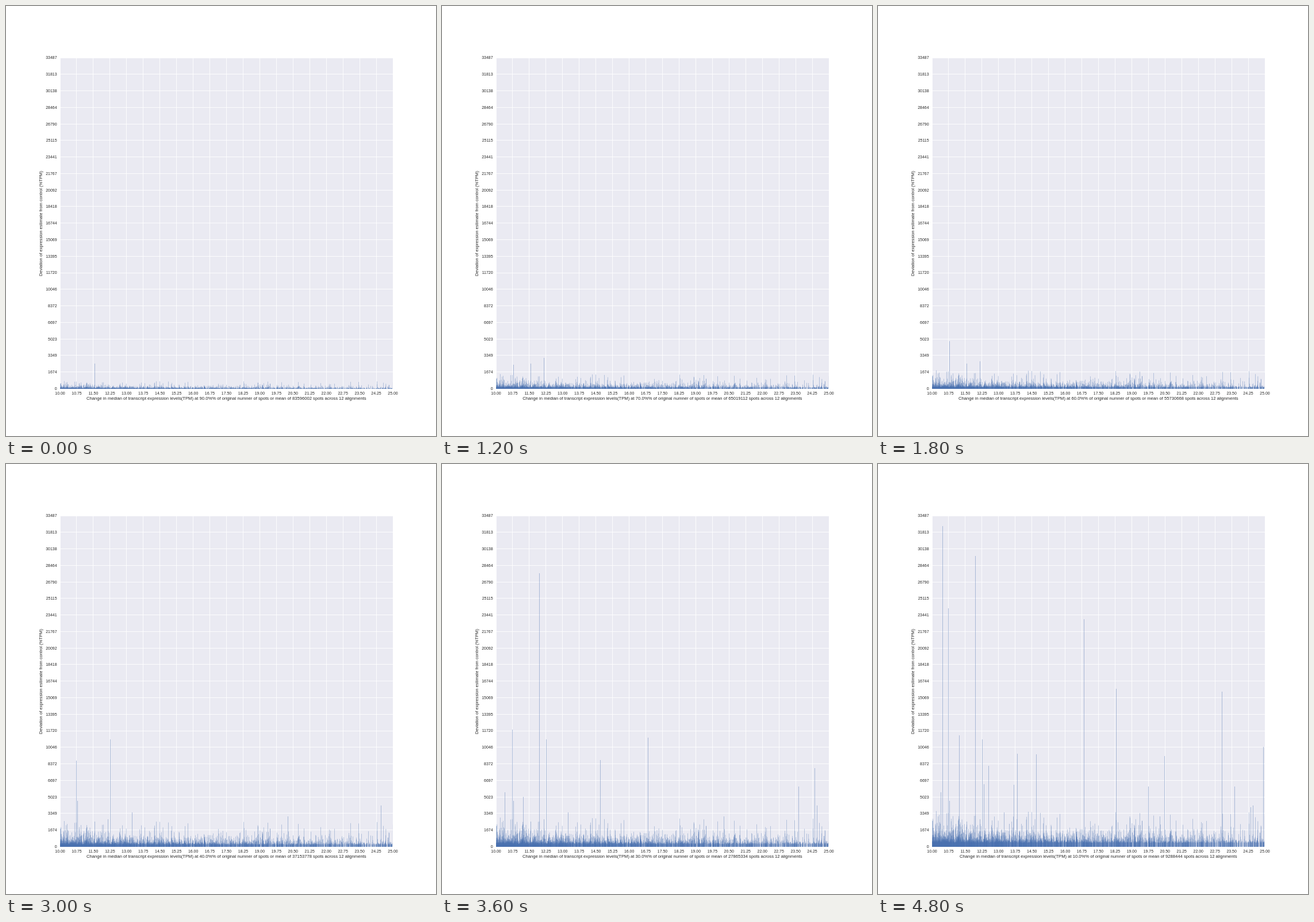
These frames come from a looping animation (748 by 748 pixels, 5.4 s). An HTML page with a canvas:

```html
<!DOCTYPE html>
<html lang="en">
<head>
<meta charset="utf-8">
<title>Expression deviation</title>
<style>
  html, body { margin: 0; width: 100%; height: 100%; overflow: hidden; background: #fff; }
  canvas { display: block; }
</style>
</head>
<body>
<canvas id="chart" width="748" height="748"></canvas>
<script>
const ctx = document.getElementById('chart').getContext('2d');
const STEP_MS = 600, STEPS = 9, TICKS = 20;
const LEFT = 94, RIGHT = 673, TOP = 90, BOTTOM = 666;
const WIDTH = RIGHT - LEFT, HEIGHT = BOTTOM - TOP;
const TOTAL_SPOTS = 92884447, MAX_DEVIATION = 33487;

// Outliers: x, first step, then bar heights; the last height stays.
const spikes = [
  [154, 0, 44],
  [177, 1, 72, 54, 48],
  [124, 2, 42, 83, 80],
  [219, 4, 60],
  [490, 4, 53],
  [652, 4, 72],
  [181, 4, 95, 187],
  [122, 5, 150, 204, 195, 415],
  [109, 6, 95],
  [141, 6, 87, 91, 194],
  [169, 6, 476, 506],
  [275, 6, 151, 45, 161],
  [358, 6, 190, 348, 396],
  [620, 6, 105],
  [648, 6, 137, 205, 69],
  [112, 7, 576, 558],
  [184, 7, 109],
  [228, 7, 190, 40],
  [498, 7, 158],
  [598, 7, 117, 270],
  [192, 8, 141],
  [236, 8, 108],
  [242, 8, 162],
  [414, 8, 275],
  [470, 8, 105],
  [670, 8, 174]
];

let seed = 20117;
function random() {
  seed = (seed * 1664525 + 1013904223) % 2 ** 32;
  return seed / 2 ** 32;
}

// Transcripts thin out towards higher expression levels.
const transcripts = Array.from({ length: 4000 }, () => {
  const level = 10 / (1 - 0.6 * random());
  return { x: LEFT + (level - 10) / 15 * WIDTH, rank: random() + 0.012 };
});

function text(content, x, y, size, align) {
  ctx.font = `${size}px "Liberation Sans", Arial, sans-serif`;
  ctx.textAlign = align;
  ctx.fillStyle = '#262626';
  ctx.fillText(content, x, y);
}

function drawAxes(step) {
  ctx.fillStyle = '#fff';
  ctx.fillRect(0, 0, 748, 748);
  ctx.fillStyle = '#eaeaf2';
  ctx.fillRect(LEFT, TOP, WIDTH, HEIGHT);

  for (let i = 0; i <= TICKS; i++) {
    const x = LEFT + WIDTH * i / TICKS;
    const y = BOTTOM - 0.5 - (HEIGHT - 0.5) * i / TICKS;
    ctx.fillStyle = 'rgba(255,255,255,.85)';
    ctx.fillRect(Math.floor(x), TOP, 1, HEIGHT);
    ctx.fillRect(LEFT, Math.floor(y), WIDTH, 1);
    text((10 + 0.75 * i).toFixed(2), x, 675.5, 6.95, 'center');
    text(Math.round(MAX_DEVIATION * i / TICKS), 88.5, y + 2.4, 6.95, 'right');
  }

  const share = STEPS - step;
  text(`Change in median of transcript expression levels(TPM) at ${share * 10}.0%% of original numner ` +
    `of spots or mean of ${Math.floor(TOTAL_SPOTS * share / 10)} spots across 12 alignments`,
    383.3, 685.4, 7.65, 'center');

  ctx.save();
  ctx.translate(63, 378.5);
  ctx.rotate(-Math.PI / 2);
  text('Deviation of expression estimate from control (%TPM)', 0, 0, 7.65, 'center');
  ctx.restore();
}

function drawBars(step) {
  const scale = 0.8 + 0.4 * step + 0.045 * step * step;
  const tail = 0.65 - 0.018 * step;
  ctx.save();
  ctx.beginPath();
  ctx.rect(LEFT, TOP, WIDTH, HEIGHT);
  ctx.clip();
  ctx.fillStyle = '#4c72b0';
  for (const { x, rank } of transcripts) {
    const height = scale * rank ** -tail;
    ctx.fillRect(x, BOTTOM - height, 0.35, height);
  }
  ctx.globalAlpha = 0.42;
  for (const [x, first, ...heights] of spikes) {
    if (step < first) continue;
    const height = heights[Math.min(step - first, heights.length - 1)];
    ctx.fillRect(x, BOTTOM - height, 1, height);
  }
  ctx.restore();
}

let shown = -1;
function render() {
  const step = Math.floor(performance.now() / STEP_MS) % STEPS;
  if (step !== shown) {
    drawAxes(step);
    drawBars(step);
    shown = step;
  }
  requestAnimationFrame(render);
}
render();
</script>
</body>
</html>
```
